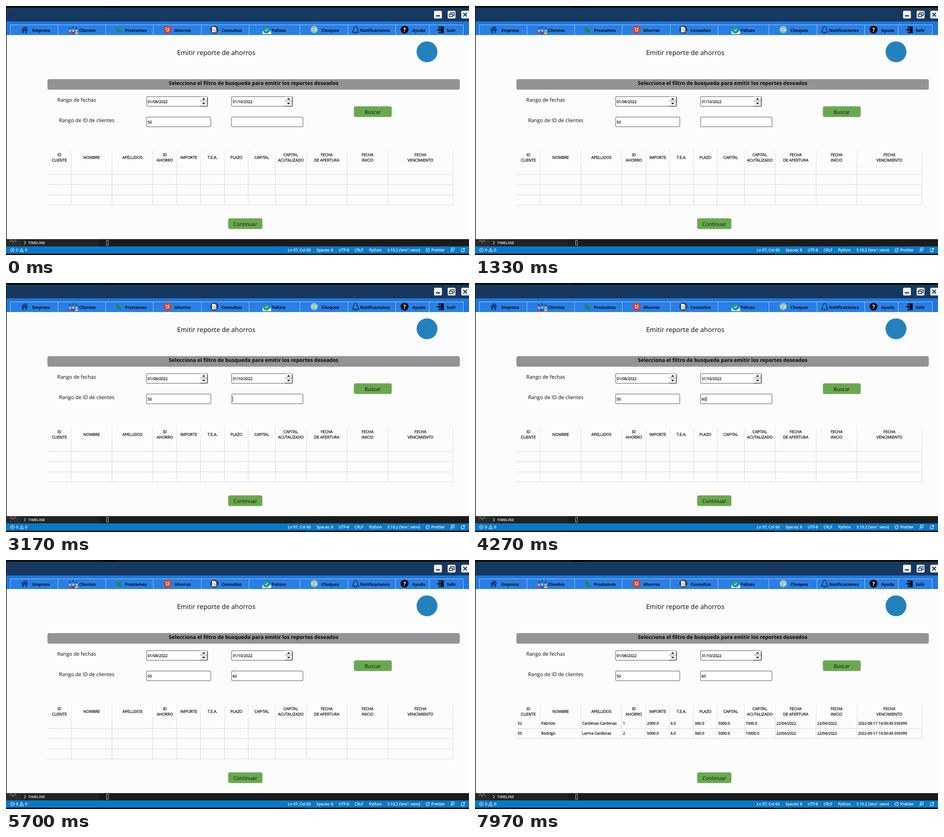
Recreate the animation shown at these times as an HTML page with a canvas. Size 1020 px wide and 549 px high, loop 8000 ms.

```html
<!DOCTYPE html>
<html lang="es">
<head>
<meta charset="utf-8">
<title>Reporte de ahorros</title>
<style>
html, body { margin: 0; width: 100%; height: 100%; overflow: hidden; background: #0b0c0e; }
canvas { display: block; width: 1020px; height: 549px; }
</style>
</head>
<body>
<canvas id="stage" width="1020" height="549"></canvas>
<script>
const ctx = document.getElementById('stage').getContext('2d');
const LOOP = 8000;
const FOCUS = 2950, TYPE_6 = 3500, TYPE_0 = 3800, BLUR = 5390, RESULT = 7500, BLINK = 530;
const INK = '#080808', NAVY = '#0e3f7c', GREEN = '#6aa84f';

function box(x, y, w, h, color) {
  ctx.fillStyle = color;
  ctx.fillRect(x, y, w, h);
}

function round(x, y, w, h, r, fill, stroke, width = 1) {
  ctx.beginPath();
  ctx.roundRect(x, y, w, h, r);
  if (fill) { ctx.fillStyle = fill; ctx.fill(); }
  if (stroke) { ctx.strokeStyle = stroke; ctx.lineWidth = width; ctx.stroke(); }
}

function disc(x, y, r, fill, stroke, width = 1) {
  ctx.beginPath();
  ctx.arc(x, y, r, 0, Math.PI * 2);
  if (fill) { ctx.fillStyle = fill; ctx.fill(); }
  if (stroke) { ctx.strokeStyle = stroke; ctx.lineWidth = width; ctx.stroke(); }
}

function shape(path, fill) {
  ctx.fillStyle = fill;
  ctx.fill(new Path2D(path));
}

function line(path, color, width = 1) {
  ctx.strokeStyle = color;
  ctx.lineWidth = width;
  ctx.stroke(new Path2D(path));
}

function text(str, x, y, size, color = INK, weight = 400, align = 'left') {
  ctx.font = `${weight} ${size}px "Open Sans", "Noto Sans", sans-serif`;
  ctx.textRendering = 'geometricPrecision';
  ctx.fillStyle = color;
  ctx.textAlign = align;
  ctx.fillText(str, x, y);
  // A hairline keeps small regular type dark enough.
  if (weight === 400 && size < 10) {
    ctx.strokeStyle = color;
    ctx.lineWidth = 0.25;
    ctx.strokeText(str, x, y);
  }
}

// ---------- window frame ----------

function drawWindow() {
  box(0, 0, 1020, 549, '#0b0c0e');
  box(215, 0, 30, 3, '#000');
  box(1, 4, 1019, 30, '#17395f');
  box(1, 34, 1019, 30, '#2077de');
  box(1.4, 64, 1018.6, 450, '#fcfcfd');
  for (const x of [943, 973, 1003]) round(x, 10.5, 17.3, 17, 2.5, '#f5f7fa');
  box(947, 20.5, 9, 2.5, '#14284a');
  line('M979.5 18V14.5H987.5V21H984.5', '#14284a', 1.6);
  ctx.strokeRect(976.5, 18, 7.5, 5.5);
  line('M1007.5 15L1015.5 23M1015.5 15L1007.5 23', '#14284a', 2);
}

// ---------- menu ----------

const icons = [
  () => {
    shape('M33 52L41 44.5 44 47.3V45.5H46.5V49.5L49 52 47.6 53.2 41 47 34.4 53.2Z', NAVY);
    shape('M35.5 53L41 48 46.5 53V59.5H42.7V55H39.3V59.5H35.5Z', NAVY);
  },
  () => {
    [['#d93b3b', 141], ['#2456c4', 148], ['#f0b92c', 155.5]].forEach(([color, x], i) => {
      disc(x, 54.5, 2.2, '#e9c3a2');
      round(x - 3.3, 57.5, 6.6, 4.5, [2.5, 2.5, 0, 0], color);
      text('★', x, i === 1 ? 49 : 51, 6.5, NAVY, 400, 'center');
    });
  },
  () => {
    shape('M239 46L249 49 254 52 246 53.5Z', '#168a4e');
    shape('M241 53L254 54 253 60 246 57Z', '#168a4e');
  },
  () => {
    disc(356, 52, 8.7, '#d5402b');
    round(352.5, 49, 7, 7, 2.5, '#f6e6df');
    disc(356, 52.5, 2.2, '#d5402b');
    line('M352 47.5L353.5 49M360 47.5L358.5 49', '#f6e6df', 1.2);
  },
  () => {
    disc(459, 52, 9, '#34414f');
    shape('M454 46H460L463 49V58H454Z', '#f4f5f3');
    line('M456 50.5H461M456 53H461M456 55.5H460', '#7c8995', 0.9);
    disc(462, 55.5, 2, '#e2ac50');
  },
  () => {
    box(565, 45, 19, 17, '#eef5f3');
    shape('M565 45H584V54L574 61 565 54Z', '#2077de');
    disc(573.5, 53, 7.5, '#239a8b');
    line('M571 52.5L573 55 577 50.5', '#d5efe3', 1.3);
  },
  () => {
    disc(679, 52, 8.2, '#8cbfb7');
    round(674, 49, 10, 6, 1, '#f2f1df');
    line('M675 51H683M675 53.5H680', '#4c6571', 1);
  },
  () => {
    line('M763 58Q766 55 766 50.5Q766 45.5 770.2 45.5Q774.5 45.5 774.5 50.5Q774.5 55 777.5 58Z M768.3 58.5Q770.2 62.5 772.2 58.5M770.2 45.5V43.5', '#0b1d36', 1.2);
  },
  () => {
    disc(878, 52, 8.7, '#06080c');
    text('?', 878, 56.8, 12.5, '#fff', 700, 'center');
  },
  () => {
    shape('M953 45H964.5V60H953V56.5H955V58H957.5V47H955V49H953Z', '#0a101a');
    shape('M949.5 51.2H954V48.5L958.5 52.5 954 56.5V53.8H949.5Z', '#0a101a');
  }
];

const menu = [['Empresa', 58], ['Clientes', 161], ['Prestamos', 262], ['Ahorros', 371], ['Consultas', 475],
  ['Polizas', 585], ['Cheques', 695], ['Notificaciones', 780], ['Ayuda', 895], ['Salir', 971]];
const menuEdges = [9, 114, 219, 324, 430, 535, 647, 753, 858, 932, 1007];

function drawMenu() {
  box(9, 41, 999, 23, '#297fe4');
  box(9, 41, 999, 1, '#a5c9f2');
  for (const x of menuEdges) box(x, 41, 1, 23, '#a5c9f2');
  icons.forEach(icon => icon());
  for (const [label, x] of menu) text(label, x, 56.5, 9.1, '#030812', 700);
}

// ---------- form ----------

function field(x, y, w, value, spin) {
  round(x + 0.75, y + 0.75, w - 1.5, 21.5, 3, '#fff', '#89898b', 1.5);
  text(value, x + 3, y + 15.3, 8.3);
  if (!spin) return;
  const left = x + w - 18, mid = left + 8.5;
  box(left, y + 1, 17, 21, '#fafafa');
  box(left, y + 10, 16, 1, '#77787b');
  box(left, y + 21, 17, 1.3, '#66676a');
  box(left + 15.7, y + 2, 1.5, 20, '#66676a');
  shape(`M${mid - 3.5} ${y + 7.5}L${mid} ${y + 4} ${mid + 3.5} ${y + 7.5}Z`, '#000');
  shape(`M${mid - 3.5} ${y + 14.5}L${mid} ${y + 18} ${mid + 3.5} ${y + 14.5}Z`, '#000');
}

function button(label, x, y, w) {
  round(x + 0.4, y + 0.3, w - 0.6, 23.4, 4, GREEN);
  text(label, x + w / 2, y + 16.5, 11.3, '#0c140a', 400, 'center');
}

function drawForm(t) {
  text('Emitir reporte de ahorros', 377, 108, 14.56);
  disc(927.5, 101, 23, '#2382bd');
  round(91.3, 161.3, 908.5, 23.2, 4, '#939395');
  text('Selecciona el filtro de busqueda para emitir los reportes deseados', 545.5, 174, 11.4, INK, 700, 'center');
  text('Rango de fechas', 113, 211.3, 11.15);
  text('Rango de ID de clientes', 117, 256.3, 11.2);

  const typed = t < TYPE_6 ? '' : t < TYPE_0 ? '6' : '60';
  field(309, 199, 136, '01/08/2022', true);
  field(496, 199, 136, '31/10/2022', true);
  field(309, 244, 143, '50');
  field(496, 244, 159, typed);

  const since = t - (t < TYPE_6 ? FOCUS : t < TYPE_0 ? TYPE_6 : TYPE_0);
  if (t >= FOCUS && t < BLUR && Math.floor(since / BLINK) % 2 === 0) {
    box(499 + Math.round(typed.length * 4.75), 250, 1, 12, '#111');
  }
  button('Buscar', 766, 221, 84);
  button('Continuar', 489, 468, 76);
}

// ---------- table ----------

const edges = [91, 143, 233, 323, 376, 428, 481, 533, 593, 661, 751, 841, 984];
const heads = ['ID|CLIENTE', 'NOMBRE', 'APELLIDOS', 'ID|AHORRO', 'IMPORTE', 'T.E.A.', 'PLAZO', 'CAPITAL',
  'CAPITAL|ACUTALIZADO', 'FECHA|DE APERTURA', 'FECHA|INICIO', 'FECHA|VENCIMIENTO'];
const opened = '22/04/2022';
const rows = [
  ['52', 'Fabricio', 'Cardenas Cardenas', '1', '2000.0', '6.0', '360.0', '5000.0', '7000.0', opened, opened, '2022-08-17 14:50:49.559399'],
  ['55', 'Rodrigo', 'Lerma Cardenas', '2', '5000.0', '6.0', '360.0', '5000.0', '10000.0', opened, opened, '2022-09-17 14:50:49.559399']
];

function drawTable(t) {
  const done = t >= RESULT;
  const count = done ? rows.length : 4;
  const bottom = Math.floor(348.5 + 22.5 * count);
  heads.forEach((head, i) => {
    const mid = (edges[i] + edges[i + 1]) / 2 + 0.5;
    const parts = head.split('|');
    parts.forEach((part, n) => text(part, mid, (parts.length > 1 ? 331.3 : 337.3) + n * 12, 8.6, INK, 400, 'center'));
    box(edges[i + 1], 318, 1, 30, '#e6e6e6');
    box(edges[i + 1], 348, 1, bottom - 348, '#d7d8d8');
  });
  for (let n = 1; n <= count; n++) box(91, Math.floor(348.5 + 22.5 * n), 894, 1, '#d7d8d8');
  if (!done) return;
  rows.forEach((row, n) => row.forEach((cell, i) => {
    text(cell, edges[i] + 3, 362.7 + n * 22.5, /[a-z]/.test(cell) ? 8.45 : 8.2);
  }));
}

// ---------- editor strip ----------

function drawEditor() {
  box(0, 514, 1020, 16, '#1b1b1c');
  box(0, 514, 33, 16, '#2b2b2c');
  box(33, 514, 172, 16, '#222223');
  ctx.save();
  ctx.beginPath();
  ctx.rect(0, 514, 33, 16);
  ctx.clip();
  disc(15.5, 514.5, 4.5, null, '#77787a', 1.6);
  line('M15.5 519V522M10 518L8.5 520M21 518L22.5 520', '#77787a', 2);
  ctx.restore();
  line('M39.5 518L43.5 522 39.5 526', '#c8c8c8', 1.1);
  text('TIMELINE', 49, 525, 7.9, '#cfcfcf', 700);
  ctx.strokeStyle = '#b9b9b9';
  ctx.lineWidth = 1;
  ctx.strokeRect(221.5, 516.5, 4, 11);
}

function drawStatus() {
  const white = '#f2f8fc';
  box(0, 530, 1020, 16, '#0879c9');
  box(0, 546, 1020, 3, '#0a0d13');
  box(660, 546, 36, 3, '#1b2735');
  disc(14, 538, 4.2, null, white, 1);
  line('M12.3 536.3L15.7 539.7M15.7 536.3L12.3 539.7', white, 1);
  line('M34.5 533.8L38.8 541.8H30.2ZM34.5 536.5V539M34.5 540V541', white, 1);
  const items = [['0', 22], ['0', 42], ['Ln 97, Col 60', 621], ['Spaces: 8', 684], ['UTF-8', 733], ['CRLF', 768],
    ['Python', 800], ["3.10.2 ('env': venv)", 840], ['Prettier', 937]];
  for (const [label, x] of items) text(label, x, 541.2, 8.5, white);
  disc(929, 538, 4, null, white, 1);
  line('M926.3 540.7L931.7 535.3', white, 1);
  line('M980.5 533.5H987.5V538.5H985L983.5 540.5M979.5 542.5Q979.5 539.5 982 539.5Q984.5 539.5 984.5 542.5', white, 1);
  disc(982, 537, 1.7, null, white, 1);
  line('M1002 541H1010.5L1009.3 538.5M1003.3 541V537Q1003.3 533.8 1006 533.8M1005 542.5H1007.5', white, 1);
  disc(1009, 535.5, 2, white);
}

function frame(now) {
  const t = now % LOOP;
  drawWindow();
  drawMenu();
  drawForm(t);
  drawTable(t);
  drawEditor();
  drawStatus();
  requestAnimationFrame(frame);
}
requestAnimationFrame(frame);
</script>
</body>
</html>
```
